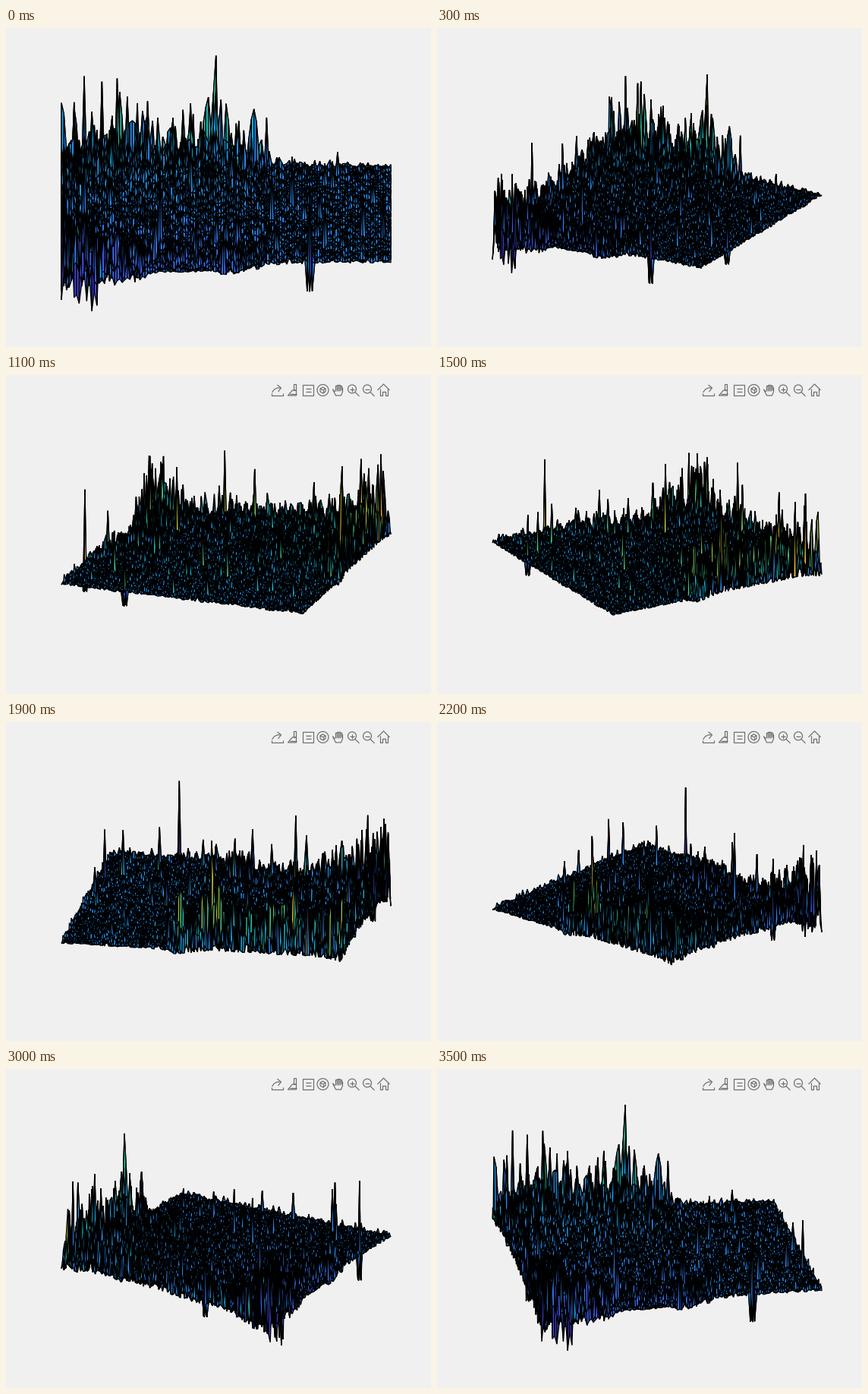
A matplotlib script for the animation above (3.6 s loop, 560 by 420 pixels).

```python
import numpy as np
import matplotlib.pyplot as plt
from matplotlib.animation import FuncAnimation
from matplotlib.collections import LineCollection, PolyCollection
from matplotlib.colors import LinearSegmentedColormap
from matplotlib.patches import Rectangle

W, H, DPI = 560, 420, 100
FRAMES, INTERVAL = 36, 100
N = 131
LEVEL = 0.31
ELEV = np.radians(30)
LEFT, RIGHT, TOP, BOTTOM = 73, 507, 31.5, 373.8
PX = 72 / DPI

PARULA = LinearSegmentedColormap.from_list("parula", [
    (0.242, 0.150, 0.660), (0.281, 0.323, 0.958), (0.179, 0.529, 0.968),
    (0.069, 0.695, 0.839), (0.216, 0.784, 0.592), (0.672, 0.779, 0.223),
    (0.997, 0.766, 0.220), (0.977, 0.984, 0.081)])

# x, y and height of the tallest lone spikes
LANDMARKS = [(.752, .011, .804), (.977, .256, .61), (.008, .315, .72),
             (.49, .01, .52), (.022, .01, .635), (.075, .033, .665),
             (.703, .577, .608), (.635, .451, .615), (.30, .223, .75)]
# x, extra height and half width of the clusters along the back ridge
CLUSTERS = [(.17, .28, .025), (.27, .20, .015), (.34, .22, .015),
            (.39, .27, .012), (.445, .36, .03), (.50, .22, .02),
            (.59, .30, .02)]
SUMMIT = (.47, .968, .995)


def bump(v, centre, width):
    return np.exp(-((v - centre) / width) ** 2)


def below(v, edge, soft=0.015):
    """Smooth step from 1 below the edge to 0 above it."""
    return 1 / (1 + np.exp((v - edge) / soft))


def cell(v):
    return int(round(v * (N - 1)))


def add_ridge(z, rng):
    """Spikes near the back edge that fall off towards the front."""
    for i in range(cell(0.62)):
        x = i / (N - 1)
        height = sum(h * bump(x, c, w) for c, h, w in CLUSTERS) + 0.05
        row = cell(rng.uniform(0.955, 0.975))
        for back, share in enumerate((1, 0.7, 0.35)):
            z[row - back, i] += share * height * rng.uniform(0.3, 1)
    i, j = cell(SUMMIT[0]), cell(SUMMIT[1])
    for back, share in enumerate((1, 0.7, 0.35)):
        z[j - back, i] = LEVEL + share * (SUMMIT[2] - LEVEL)


def add_landmarks(z):
    """Lone spikes; those by an edge pull their neighbours down."""
    for x, y, h in LANDMARKS:
        i, j = cell(x), cell(y)
        by_edge = min(x, y, 1 - x, 1 - y) < 0.035
        drop = (0.38 if by_edge else 0.1) * (h - LEVEL)
        for di, dj in ((1, 0), (-1, 0), (0, 1), (0, -1)):
            z[j + dj, i + di] = LEVEL - drop
        z[j, i] = h


def make_surface():
    rng = np.random.default_rng(12)
    x, y = np.meshgrid(np.linspace(0, 1, N), np.linspace(0, 1, N))
    rough = below(x, 0.62)
    ridge = rough * (bump(y, 0.97, 0.06) + 0.5 * bump(y, 0.92, 0.25))
    front = rough * bump(y, 0.07, 0.12)
    corner = bump(x, 0, 0.17) * bump(y, 0, 0.13)
    calm = (1 - below(x, 0.26)) * below(x, 0.47) * below(y, 0.045)

    sigma = (0.024 - 0.012 * x) * (0.9 + 0.25 * np.sin(20 * y + 3 * x))
    sigma += 0.035 * ridge + 0.02 * front + 0.07 * corner
    sigma += 0.02 * bump(x, 0, 0.05)
    sigma *= 1 - 0.9 * calm

    n = rng.standard_normal((N, N))
    z = LEVEL + 0.13 * (y - 0.5) * below(x, 0.56, 0.04)
    z += sigma * np.minimum(n + 0.4 * (n * n - 1), 3.5)

    density = (0.004 + 0.04 * (front + ridge)) * (1 - calm)
    hit = rng.random((N, N)) < density
    z += hit * np.minimum(rng.exponential(0.1, (N, N)), 0.28)
    z[0] -= 0.28 * rng.random(N) ** 2 * bump(x[0], 0.04, 0.12)

    add_ridge(z, rng)
    add_landmarks(z)
    return x, y, np.clip(z, 0.005, 0.995)


def project(azimuth):
    """Screen corners of every cell, farthest cell first."""
    c, s = np.cos(azimuth), np.sin(azimuth)
    u, depth = c * X + s * Y, c * Y - s * X
    span = abs(c) + abs(s)
    u = (u - u.min()) / span
    v = (depth - depth.min()) * np.sin(ELEV) + Z * np.cos(ELEV)
    v /= span * np.sin(ELEV) + np.cos(ELEV)
    pts = np.dstack([LEFT + u * (RIGHT - LEFT), BOTTOM - v * (BOTTOM - TOP)])
    quads = np.stack([pts[:-1, :-1], pts[:-1, 1:], pts[1:, 1:], pts[1:, :-1]],
                     axis=2).reshape(-1, 4, 2)
    middle = depth[:-1, :-1] + depth[1:, 1:]
    order = np.argsort(-middle.ravel(), kind="stable")
    return quads[order], order


def ring(cx, cy, r, n=24, start=0.0):
    t = start + np.linspace(0, 2 * np.pi, n)
    return list(zip(cx + r * np.cos(t), cy + r * np.sin(t)))


def box(x0, y0, x1, y1):
    return [(x0, y0), (x1, y0), (x1, y1), (x0, y1), (x0, y0)]


def toolbar_lines():
    lens = [ring(-1.5, -1.5, 5.5), [(2.5, 2.5), (8, 8)],
            [(-4.5, -1.5), (1.5, -1.5)]]
    fingers = [[(a, 1), (a, -6 - b), (a + 2, -6 - b), (a + 2, 0)]
               for a, b in ((-4, 0), (-2, 1.5), (0, 1.5), (2, 0))]
    palm = [(-4, 2), (-7, -1), (-3, 7), (4, 7), (6, 2), (6, -3), (4, -3)]
    spokes = [[(0, 0), (4 * np.cos(t), 4 * np.sin(t))]
              for t in np.pi / 2 + np.arange(3) * 2 * np.pi / 3]
    icons = [
        [[(-8, 4), (-8, 7), (7, 7), (7, 4)],
         [(-7, 3), (-4, -1), (0, -3), (4, -3)], [(0, -7), (5, -3), (1, 2)]],
        [box(1, -8, 4, 0), [(0, 0), (5, 0), (5, 7), (-6, 7), (0, 0)],
         [(-4, 5), (5, 5)]],
        [box(-7, -7, 7, 7), [(-3, -2), (4, -2)], [(-3, 2), (4, 2)]],
        [ring(0, 0, 7.5), ring(0, 0, 4, 7, np.pi / 6)] + spokes,
        fingers + [palm],
        lens + [[(-1.5, -4.5), (-1.5, 1.5)]],
        lens,
        [[(-8, 0), (0, -8), (8, 0)],
         [(-5, -2), (-5, 7), (-2, 7), (-2, 2), (2, 2), (2, 7), (5, 7), (5, -2)]],
    ]
    return [[(357.5 + 20 * k + a, 20 + b) for a, b in line]
            for k, lines in enumerate(icons) for line in lines]


X, Y, Z = make_surface()
COLORS = PARULA(Z)[:-1, :-1].reshape(-1, 4)

fig = plt.figure(figsize=(W / DPI, H / DPI), dpi=DPI, facecolor="#f0f0f0")
ax = fig.add_axes([0, 0, 1, 1])
ax.set(xlim=(0, W), ylim=(H, 0))
ax.axis("off")

quads, order = project(0)
mesh = PolyCollection(quads, facecolors=COLORS[order], edgecolors="black",
                      linewidths=1.3 * PX, joinstyle="bevel")
ax.add_collection(mesh, autolim=False)
panel = ax.add_patch(Rectangle((347, 10), 160, 21, fc="white", ec="none"))
icons = LineCollection(toolbar_lines(), colors="#6e6e6e", linewidths=1.2 * PX)
ax.add_collection(icons, autolim=False)


def update(k):
    quads, order = project(2 * np.pi * k / FRAMES)
    mesh.set_verts(quads)
    mesh.set_facecolor(COLORS[order])
    icons.set_visible(k >= 4)
    panel.set_visible(4 <= k <= 8)
    return mesh, panel, icons


anim = FuncAnimation(fig, update, frames=FRAMES, interval=INTERVAL,
                     repeat=True, repeat_delay=0)
plt.show()
```
